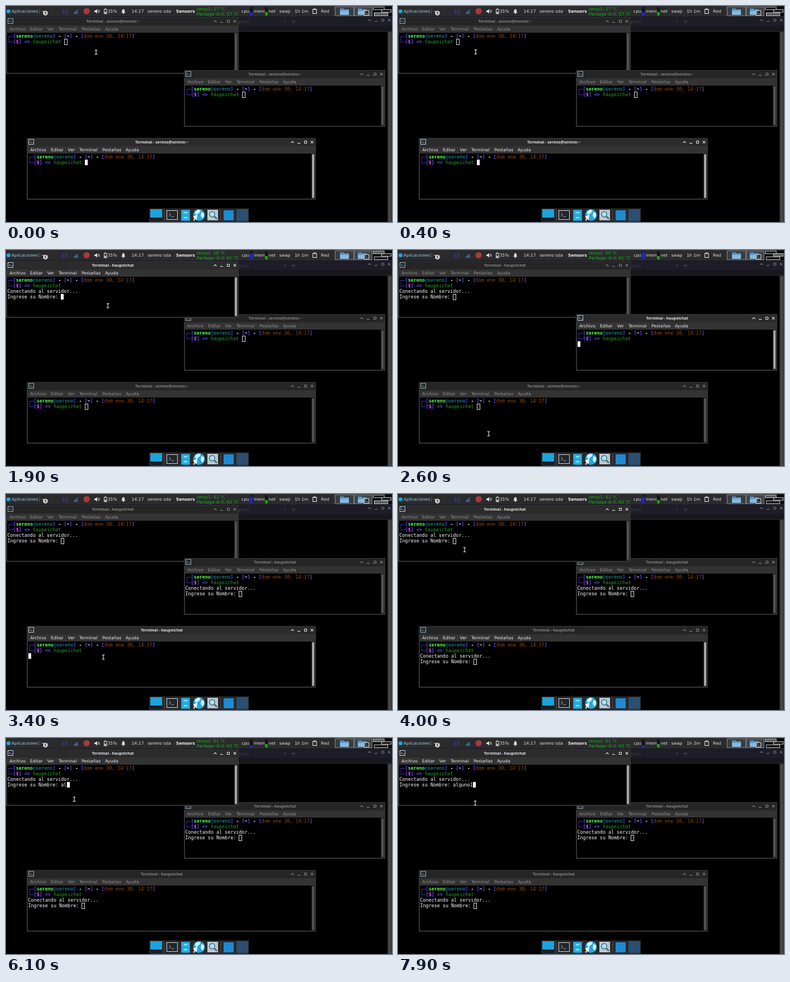
Animation, 690 px wide and 388 px high, one loop 8000 ms. Source, as an HTML page with a canvas:

```html
<!DOCTYPE html>
<html lang="es">
<head>
<meta charset="utf-8">
<title>Terminales</title>
<style>
html, body { margin: 0; width: 690px; height: 388px; overflow: hidden; background: #000; }
canvas { display: block; }
</style>
</head>
<body>
<canvas id="stage" width="690" height="388"></canvas>
<script>
const c = document.getElementById('stage').getContext('2d');
const LOOP = 8000, CELL = 5.05, ROW = 10.1;
const SANS = '"DejaVu Sans", sans-serif';
const MONO = '8.39px "DejaVu Sans Mono", monospace';
const USER = 'sereno', NAME = 'alguno1';
const typedAt = [5000, 5300, 6200, 6500, 7100, 7300, 7900];

const wins = [
  { x: 0, y: 20, w: 416, h: 102, enter: 1100, connect: 1500 },
  { x: 318, y: 115, w: 360, h: 102, enter: 2500, connect: 2800 },
  { x: 37, y: 237, w: 517, h: 111, enter: 3300, connect: 3600 }
];
const focusSteps = [[0, 2], [500, 0], [2200, 1], [3000, 2], [4000, 0]];
const sensorSteps = [[0, [57, 57]], [700, [58, 61]], [2000, [60, 61]], [3300, [61, 62]], [4700, [60, 61]], [6100, [61, 62]]];
const cpuSteps = [[0, 6], [800, 11], [2000, 13], [3300, 12], [4400, 6], [5500, 4], [6500, 6], [7500, 4]];
// time, x, y
const mousePath = [[0, 161, 83], [100, 161, 83], [600, 127, 82], [1800, 127, 82], [2150, 400, 172],
  [2300, 400, 172], [2600, 162, 330], [2950, 174, 293], [3600, 174, 293], [3950, 119, 100],
  [4700, 119, 100], [5000, 122, 110], [7750, 122, 110], [7900, 138, 117], [8000, 138, 117]];

const step = (list, t) => list.filter(s => s[0] <= t).pop()[1];
const stack = top => [0, 1, 2].filter(i => i !== top).concat(top);

function box(x, y, w, h, color) {
  c.fillStyle = color;
  c.fillRect(x, y, w, h);
}
function frame(x, y, w, h, color, width = 1) {
  c.strokeStyle = color;
  c.lineWidth = width;
  c.strokeRect(x, y, w, h);
}
function dot(x, y, r, color) {
  c.fillStyle = color;
  c.beginPath();
  c.arc(x, y, r, 0, 7);
  c.fill();
}
function path(points, color, width = 1) {
  c.strokeStyle = color;
  c.lineWidth = width;
  c.beginPath();
  points.forEach(([x, y]) => c.lineTo(x, y));
  c.stroke();
}
function shape(points, color) {
  c.fillStyle = color;
  c.beginPath();
  points.forEach(([x, y]) => c.lineTo(x, y));
  c.fill();
}
function text(s, x, y, color, font = '7.65px ' + SANS, align = 'left') {
  c.font = font;
  c.textAlign = align;
  c.fillStyle = color;
  c.fillText(s, x, y);
}

function termIcon(x, y, w, h, color) {
  box(x, y, w, h, '#20262a');
  frame(x + .5, y + .5, w - 1, h - 1, color);
  const k = h / 10;
  path([[x + 2.5 * k, y + 3 * k], [x + 4.3 * k, y + 4.7 * k], [x + 2.5 * k, y + 6.4 * k]], color, .9);
  path([[x + 5 * k, y + 6.6 * k], [x + 7.5 * k, y + 6.6 * k]], color, .9);
}
function folder(x, y) {
  box(x, y, 7, 4, '#4b7fae');
  box(x, y + 2, 16, 10, '#5f9acb');
  box(x, y + 5, 16, 7, '#8ab8dd');
}
function buttons(right, y, color) {
  const [up, min, max, x] = [42, 30.5, 18.5, 7].map(d => right - d);
  path([[up - 2.5, y + 1.3], [up, y - 1.2], [up + 2.5, y + 1.3]], color, 1.2);
  path([[min - 2.5, y + 2], [min + 2.5, y + 2]], color, 1.2);
  frame(max - 2, y - 2, 4, 4, color);
  path([[x - 2.2, y - 2.2], [x + 2.2, y + 2.2]], color, 1.1);
  path([[x - 2.2, y + 2.2], [x + 2.2, y - 2.2]], color, 1.1);
}

function run(x, y, parts) {
  let col = 0;
  for (const [s, color, bold] of parts) {
    text(s, x + col * CELL, y + 7.8, color, (bold ? 'bold ' : '') + MONO);
    col += s.length;
  }
  return col;
}

function terminal(win, t, active, focused) {
  const { x, y, w, h } = win;
  const titleColor = active ? '#e4e4e4' : '#848484';
  box(x, y, w, h, '#343434');
  box(x + 1, y + 1, w - 2, 14, active ? '#2b2b2c' : '#252526');
  box(x + 2, y + 15, w - 4, 13, '#333333');
  termIcon(x + 3, y + 2, 10, 10, active ? '#c4d4dc' : '#9aabb3');
  const title = 'Terminal - ' + (t < win.enter ? USER + '@' + USER + ':~' : 'haupeichat');
  text(title, x + w / 2 - 17, y + 10, titleColor, 'bold 6.9px "Noto Sans", sans-serif', 'center');
  buttons(x + w, y + 7.5, titleColor);
  ['Archivo', 'Editar', 'Ver', 'Terminal', 'Pestañas', 'Ayuda'].forEach((s, i) =>
    text(s, x + [6.3, 43, 73.5, 94, 135, 177][i], y + 24.2, focused ? '#eeeeee' : '#929292'));
  box(x + 2, y + 28, w - 4, h - 30, '#000');
  box(x + w - 8, y + 28, 6, h - 30, '#242424');
  box(x + w - 7, y + 29.5, 4, h - 33, focused ? '#a5a5a5' : '#525252');

  const tx = x + 2.5, ty = y + 28.7;
  const purple = '#6247ff', white = '#fff';
  run(tx, ty, [['┌─[', purple, 1], [USER, '#55ff55', 1], ['@', '#2769c7'], [USER, '#2aa1a8'],
    [']', purple, 1], [' - ', white, 1], ['[', purple, 1], ['~', white, 1], [']', purple, 1],
    [' - ', white, 1], ['[', purple, 1], ['dom ene 30, 14:17', '#9c4a08'], [']', purple, 1]]);
  let col = run(tx, ty + ROW, [['└─[', purple, 1], ['$', '#ef4cef', 1], [']', purple, 1],
    [' <> ', '#5858ff', 1], ['haupeichat', '#20a51f']]) + 1;
  let row = 1;
  if (t >= win.enter) [row, col] = [2, 0];
  if (t >= win.connect) {
    const typed = win === wins[0] ? NAME.slice(0, typedAt.filter(k => k <= t).length) : '';
    run(tx, ty + 2 * ROW, [['Conectando al servidor...', white]]);
    col = run(tx, ty + 3 * ROW, [['Ingrese su Nombre: ' + typed, white]]);
    row = 3;
  }
  const cx = Math.round(tx + col * CELL), cy = Math.round(ty + row * ROW);
  if (active && focused) box(cx, cy, 5, 10, white);
  else frame(cx + .5, cy + .5, 5, 10, '#dcdcdc');
}

function backWindow() {
  box(0, 18, 690, 18, '#1d1c27');
  box(0, 36, 690, 10, '#17171c');
  box(0, 45, 690, 1, '#303034');
  text('Diagram', 402, 31, '#41414c');
  path([[497, 26], [501, 30]], '#3a3a46');
  path([[497, 30], [501, 26]], '#3a3a46');
  path([[511, 28], [517, 28]], '#4a4a58');
  path([[514, 25], [514, 31]], '#4a4a58');
  buttons(692, 25.5, '#74747c');
  box(682, 46, 8, 342, '#2a2a2b');
  box(683, 47, 6, 341, '#444445');
}

function pager(active) {
  box(587, 1, 35, 17, '#3a3d41');
  box(622, 1, 33, 17, '#43464a');
  box(655, 1, 35, 17, '#08080a');
  frame(588.5, 1.5, 33, 16, '#7b7f84');
  frame(622.5, 1.5, 32, 16, '#7b7f84');
  folder(597, 4);
  folder(629, 4);
  termIcon(640, 8, 9, 9, '#cfd8dc');
  for (const i of stack(active)) {
    const { x, y, w, h } = wins[i], k = .047;
    box(656 + x * k, 1 + y * k, w * k, h * k, i === active ? '#55585c' : '#161618');
    frame(656.5 + x * k, 1 + y * k, w * k, h * k, '#dcdcdc', .9);
  }
}

function panel(t, active) {
  box(0, 0, 690, 18.5, '#2b2b2d');
  const ink = '#dedede';
  const put = (s, x) => text(s, x, 12.4, ink);
  dot(4.5, 9.5, 3.5, '#1ba6e0');
  text('Aplicaciones', 9.8, 12.4, '#9dcbe0');
  for (const y of [6.5, 9.3, 12]) box(59.5, y, 1.3, 1.3, '#8a8a8a');
  box(64, 9, 5, 1, '#c8c8c8');
  dot(70.5, 12.7, 4, '#f2f2f2');
  text('5', 70.5, 15.2, '#222', 'bold 6.5px ' + SANS, 'center');
  text('ES', 100, 12.6, '#35388a', 'bold 8px ' + SANS);
  for (let i = 0; i < 4; i++) box(121 + i * 2.1, 12 - i * 2, 1.5, 2 + i * 2, i < 3 ? '#3d83c9' : '#46546a');
  dot(144, 9.3, 5.6, '#a83a38');
  shape([[158, 8], [160, 8], [163, 5.5], [163, 13.5], [160, 11], [158, 11]], ink);
  for (const r of [2, 4]) {
    c.strokeStyle = ink;
    c.lineWidth = 1;
    c.beginPath();
    c.arc(163, 9.5, r, -.8, .8);
    c.stroke();
  }
  frame(175.5, 6, 4.5, 8, ink);
  box(176.7, 4.5, 2, 1.5, ink);
  box(176.5, 10.5, 2.5, 2.8, ink);
  put('35%', 181.5);
  shape([[206, 12], [207.3, 10.5], [207.8, 7], [209.8, 5.2], [211.8, 7], [212.3, 10.5], [213.6, 12]], ink);
  dot(209.8, 13, 1.2, ink);
  put('14:17', 224.5);
  put(USER + ' sda', 253);
  text('Sensors', 304, 12.4, '#f0f0f0', 'bold 7.5px ' + SANS);
  const [temp, pack] = step(sensorSteps, t);
  text('temp1: ' + temp + ' °C', 341, 7.8, '#14b614');
  text('Package id 0: ' + pack + ' °C', 341, 17, '#14b614');
  const bars = [['cpu', 421, 436.5], ['mem', 443, 463.5], ['net', 469.5, 0], ['swap', 488.5, 0]];
  for (const [s, x, bar] of bars) {
    put(s, x);
    if (bar) box(bar, 2, 4, 15, '#131315');
  }
  const cpu = step(cpuSteps, t);
  box(436.5, 17 - cpu, 4, cpu, '#2424f0');
  box(463.5, 11, 4, 6, '#16b516');
  put(t < 7500 ? '1h 1m' : '1h 2m', 516);
  frame(548.5, 6, 6.5, 7.5, '#d2d2d2', 1.2);
  box(550, 4.5, 3.5, 2.5, '#d2d2d2');
  put('Red', 563);
  pager(active);
}

function dock() {
  box(256, 363.5, 178, 25, '#29292b');
  box(258, 365, 21, 21, '#1ba4dc');
  box(258, 380, 21, 6, '#101d24');
  box(282.5, 366, 1, 20, '#48484a');
  termIcon(287, 367, 20, 17, '#d3d7da');
  box(313, 366, 16, 20, '#1c94c8');
  for (const y of [367.5, 376.5]) {
    box(314.5, y, 13, 8, '#2db2e4');
    box(318.5, y + 3, 5, 1.5, '#e8f7fc');
  }
  dot(345, 375.5, 10.5, '#22a7dd');
  shape([[338, 369], [343, 366], [348, 367], [346, 371], [342, 374], [338, 374]], '#d9f1fa');
  shape([[349, 370], [354, 372], [354, 378], [351, 382], [348, 377]], '#d9f1fa');
  shape([[334, 379], [342, 374], [341, 385], [339, 382], [336, 386], [334.5, 385], [337, 381]], '#f4f4f4');
  box(360, 366, 19, 19, '#bcc8ce');
  dot(368.5, 374, 5.5, '#366f8c');
  dot(368.5, 374, 4, '#b4e2f2');
  path([[372.5, 378], [377, 382.5]], '#31556a', 2.2);
  box(383, 366, 1, 20, '#48484a');
  box(389, 367, 18, 18, '#1f8ad2');
  box(412, 365, 21, 21, '#2b4f70');
}

function mouse(t) {
  const i = mousePath.findIndex(p => p[0] > t);
  const [a, b] = [mousePath[i - 1], mousePath[i]];
  let u = (t - a[0]) / (b[0] - a[0]);
  u = u * u * (3 - 2 * u);
  const x = a[1] + (b[1] - a[1]) * u, y = a[2] + (b[2] - a[2]) * u;
  for (const [color, width] of [['#000', 2.4], ['#f2f2f2', 1.1]]) {
    path([[x, y - 3.7], [x, y + 3.7]], color, width);
    path([[x - 2.3, y - 3.8], [x + 2.3, y - 3.8]], color, width);
    path([[x - 2.3, y + 3.8], [x + 2.3, y + 3.8]], color, width);
  }
}

function draw(now) {
  const t = now % LOOP;
  // The title bar reacts first, the contents a moment later.
  const active = step(focusSteps, t), focused = step(focusSteps, Math.max(0, t - 100));
  box(0, 0, 690, 388, '#000');
  backWindow();
  for (const i of stack(active)) terminal(wins[i], t, i === active, i === focused);
  panel(t, active);
  dock();
  mouse(t);
}

const start = performance.now();
function tick() {
  draw(performance.now() - start);
  requestAnimationFrame(tick);
}
tick();
</script>
</body>
</html>
```
